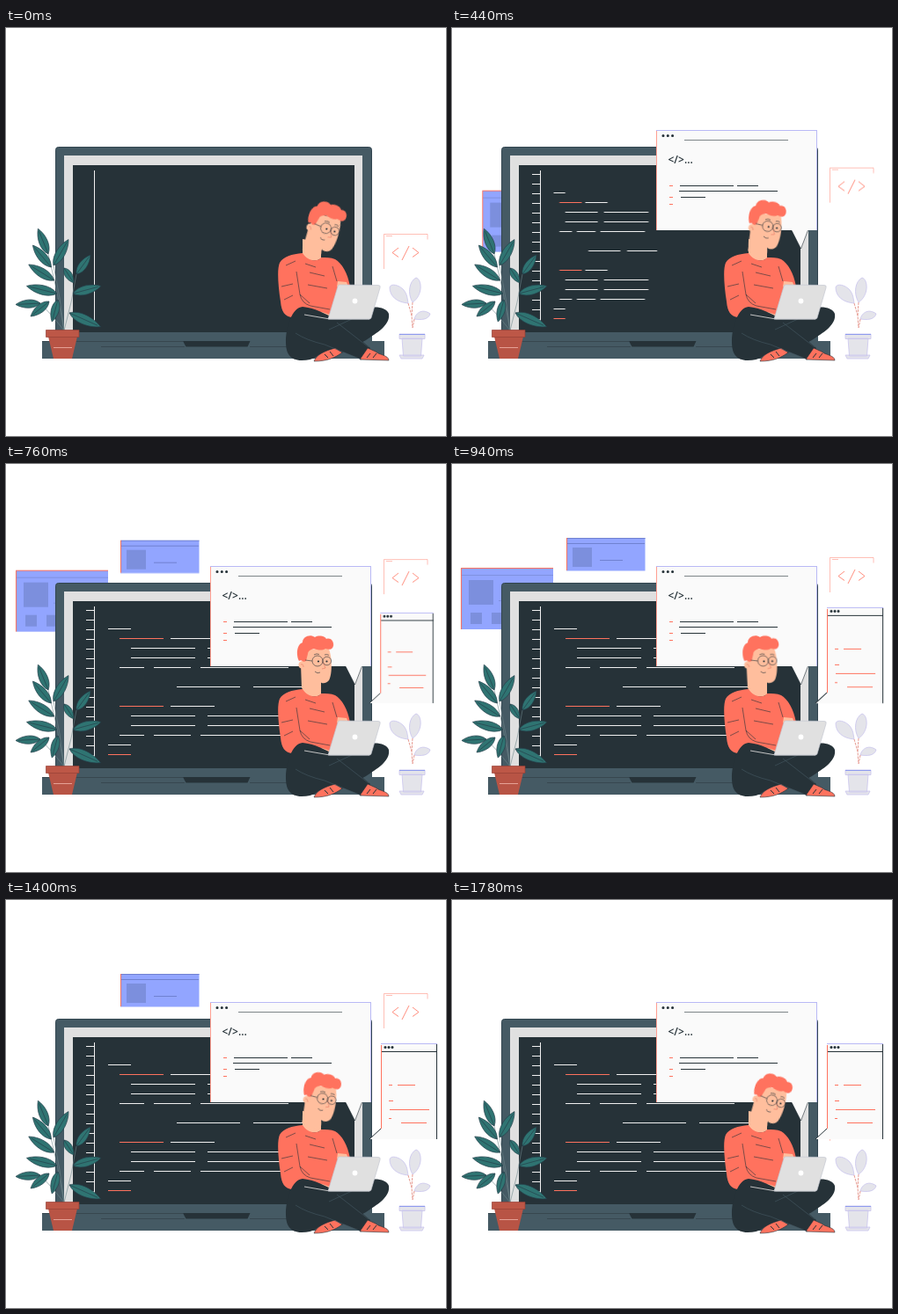
Animation of 500 by 464 pixels, one loop 1800 ms. Source, as an HTML page:

```html
<!DOCTYPE html>
<html lang="en">
<head>
<meta charset="utf-8">
<title>Developer at work</title>
<style>
html, body { margin: 0; width: 100%; height: 100%; overflow: hidden; background: #fff; }
svg { display: block; width: 500px; height: 464px; }
.slide, .drop, .bubble, #code, #cover, #head { animation: 1800ms linear infinite; }
.slide { animation-name: slide; }
.drop { animation-name: drop; }
#bigBubble { animation-name: popBig; transform-origin: 400px 249px; }
#sideBubble { animation-name: popSide; transform-origin: 413px 272px; }
#code { animation-name: type; transform-origin: 115px 0; }
#cover { animation-name: uncover; transform-origin: 95px 334px; }
#head { animation-name: nod; transform-origin: 347px 256px; }

/* rise, rest, sink */
@keyframes slide {
  0%, 12.2% { transform: translate(0, var(--dy)); animation-timing-function: ease; }
  48.3%, 80% { transform: none; animation-timing-function: ease; }
  100% { transform: translate(0, var(--dy)); }
}
@keyframes drop {
  0%, 12.2% { transform: translate(59px, 162px); animation-timing-function: ease; }
  48.3%, 66.7% { transform: none; animation-timing-function: ease; }
  81%, 100% { transform: translate(59px, 162px); }
}
@keyframes popBig {
  0%, 1.1% { transform: scale(0); }
  10.7% { transform: scale(1.2); animation-timing-function: ease-in-out; }
  18.6%, 100% { transform: none; }
}
@keyframes popSide {
  0%, 33.3% { transform: scale(0); }
  44.7% { transform: scale(1.2); animation-timing-function: ease-in-out; }
  52.8%, 100% { transform: none; }
}
@keyframes type {
  0%, 16.7% { transform: scaleX(0); animation-timing-function: ease-in-out; }
  32.2%, 100% { transform: none; }
}
@keyframes uncover {
  0%, 4.6% { transform: none; }
  24.4%, 100% { transform: scaleY(0); }
}
@keyframes nod {
  0%, 100% { transform: rotate(18deg); animation-timing-function: ease-in-out; }
  50% { transform: rotate(-1deg); animation-timing-function: ease-in-out; }
}
.line { fill: none; stroke-width: 1; }
.thin { stroke-width: .6; }
.ink { stroke: #263238; }
.coral { stroke: #ff725e; }
.dots { stroke: #263238; stroke-width: 3.1; stroke-linecap: round; }
.dark { fill: #263238; }
.skin { fill: #ffbe9d; }
.wool { fill: #ff725e; }
</style>
</head>
<body>
<svg viewBox="0 0 500 464">
  <!-- cards behind the monitor -->
  <g class="drop">
    <path fill="#92a5ff" d="M10 118h105v70H10z"/>
    <path fill="#7c8fdd" d="M19 132h28v28H19zM21 169h13v13H21zM45 169h13v13H45z"/>
    <path class="line" stroke="#8091e0" d="M11 126.500h104M53 155.500h14"/>
    <path class="line coral" d="M10.500 188v-69.500H115"/>
  </g>
  <g class="slide" style="--dy:162px">
    <path fill="#92a5ff" d="M130 84h89.500v37.500H130z"/>
    <path fill="#7c8fdd" d="M137 95h22v22h-22z"/>
    <path class="line" stroke="#7081d0" d="M130 84.500h89.500M131 90.500h88M168 109.500h26"/>
    <path class="line coral" d="M130.500 84v37"/>
  </g>

  <!-- monitor -->
  <path fill="#455a64" stroke="#324550" d="M56.500 347V138.500q0-3 3-3h353q3 0 3 3V347z"/>
  <path fill="#455a64" d="M56 346h360v10h14v20H41v-20h15z"/>
  <path fill="#e0e0e0" d="M66 145h339v201H66z"/>
  <path class="dark" d="M76 156h320v190H76zM201 356h76.500l-3 6.500h-70z"/>
  <path class="line" stroke="#37474f" d="M41 356.500h160M108 362.500h95M277 362.500h45"/>
  <path stroke="#f0f0f0" stroke-width="9" stroke-dasharray="1 10" d="M95.500 166V333"/>
  <path id="cover" class="dark" d="M90 162h10v172H90z"/>
  <path class="line" stroke="#f0f0f0" d="M100.500 162V333"/>
  <g id="code"></g>

  <!-- small window -->
  <g class="slide" style="--dy:128px">
    <path fill="#fff" d="M430 106h49v40h-49z"/>
    <path class="line coral" opacity=".45" d="M429.500 146v-39.500h49.500v6M432 108.500h7"/>
    <path class="line coral" opacity=".8" d="M446 122l-7 5.500 7 5M458 120l-8 16M462 122l7 5.500-7 5"/>
  </g>

  <!-- large speech bubble -->
  <g id="bigBubble" class="bubble">
    <path fill="#fafafa" d="M232 116h183v114h-10.500l-8 21-10.500-21H232z"/>
    <path class="line thin ink" d="M386 230.500l10.500 20.500 8-21"/>
    <path class="line" stroke="#b9b9f5" d="M232 116.500h183M414.500 117v113"/>
    <path class="line" stroke="#ff9f92" d="M232.500 117v113"/>
    <path class="line" stroke="#7d8588" d="M264 127.500h118"/>
    <path class="dots" stroke-dasharray="0 5.300" d="M240 122.500h11"/>
    <text x="245.500" y="153.500" font-family="'Open Sans', sans-serif" font-size="12" font-weight="600" fill="#263238">&lt;/&gt;...</text>
    <path class="line ink" d="M259 179.500h61M324 179.500h24M258 185.500h112M260 192.500h28"/>
    <path class="line coral" d="M247 179.500h4M247 192.500h4M247 200.500h4"/>
  </g>

  <!-- side speech bubble -->
  <g id="sideBubble" class="bubble">
    <path fill="#fafafa" d="M426 163h64v109h-77l13-13z"/>
    <path class="line" stroke="#b9b9f5" d="M426 163.500h64"/>
    <path class="line ink" d="M427 172.500h63M489.500 164v108M426 260l-13 12"/>
    <path class="line coral" d="M426.500 165v95M435 210.500h4M445 210.500h20M435 228.500h5M436 238.500h45M435 248.500h3M449 253.500h29"/>
    <path class="dots" stroke-dasharray="0 4" d="M431 167.500h8.500"/>
  </g>

  <!-- pale plant -->
  <g fill="#e4e4ea" stroke="#c9c5ee" stroke-width=".8">
    <path d="M457 313c-13-1-21-8-21-18 1-5 11-3 16 3 4 5 4 9 5 15z"/>
    <path d="M462 312c-6-10-4-24 4-28 7 2 8 20-4 28z"/>
    <path d="M464 331c2-8 10-12 18-6-2 7-10 7-18 6z"/>
    <path d="M450 353h23l-1.500 20h-20zM447 348h29v5.500h-29zM447 372h28l-2 4h-24z"/>
  </g>
  <path class="line" stroke="#e69a90" stroke-dasharray="3 1" d="M457 313l4 14 1 14M462 312l-1 15M464 331l-2 10"/>
  <path class="line" stroke="#8e9bef" d="M447 348.500h29"/>

  <!-- man -->
  <path class="skin" d="M337 240l21 4v18q-9 6-21-2z"/>
  <path class="wool" d="M337 256c-12 1-22 4-26 11-3 7-2 25 1 44 1 12 5 17 13 18l42 1 24-36c-3-16-9-26-17-31-5-2-10-2-16-2-3 5-15 5-21-5z"/>
  <path class="skin" d="M343 324l16-1 12 4-3 5-22-1zM377 288l10 1 2 5h-13z"/>
  <path class="line thin ink" d="M330 277l4 26q2 10 12 13l22 4M334 303l11 10M318 270l11-5M313 294l13-3M345 278l17 4M340 268l12 4M343 292l22 4M371 271l5 17M316 309l10-5"/>
  <path class="dark" d="M397 323c16-8 35-7 38 2 2 13-14 22-26 30l-26 14-20 8-30-20 40-27z"/>
  <path class="dark" d="M337 317c13 1 26 8 39 15l38 32-10 13-42-17c-3 12-12 18-26 18-14 0-18-9-18-21 0-17 7-39 19-40z"/>
  <path class="wool" stroke="#263238" stroke-width=".6" d="M350 379c3-8 13-12 24-15l8 5c-8 6-17 10-32 10zM402 377l9-13 9 4c4 4 15 4 15 10z"/>
  <path class="line ink" d="M362 371l4 4M368 368l4 5M414 370l-4 5M421 370l-4 5"/>
  <path class="line thin" stroke="#455a64" d="M329 347q12 8 33 13l42 17M367 343l26-12M376 335l36 28"/>
  <path class="line" stroke="#c4c4c4" d="M339 326l29 5h45"/>
  <path fill="#e0e0e0" stroke="#c5c8d2" stroke-width=".7" d="M379 292l44 .5q3 0 2 3l-10 34q-.6 1.500-2 1.500h-47l11-37q.5-2 2-2z"/>
  <circle cx="396.500" cy="310.500" r="2.900" fill="#fff"/>

  <g id="head">
    <path class="skin" d="M336 255l-1-28 4-15 27-4c5 10 5 32 1 38-4 5-9 3-10 2l1 8q-11 7-22-1z"/>
    <path class="wool" d="M333 224c-4-8-2-19 4-21 0-7 9-10 14-6 5-3 12-1 13 2 6-2 9 4 8 8-1 5-6 4-9 3-4 3-10 1-13 0-4 1-7 3-7 6l-2 8-3 1q-2-3-5-1z"/>
    <circle cx="336.500" cy="228.500" r="4" class="skin"/>
    <path class="line thin" stroke="#e57561" d="M335 228q3-1 3 3M360 225l3 7-4 1"/>
    <path class="line thin ink" d="M348 224a6 6 0 1 0 12 0a6 6 0 1 0-12 0l-8-1M360 224a4.800 4.800 0 1 0 9.600 0a4.800 4.800 0 1 0-9.600 0M350 217q3-2 6-.5M362 217q3-1 5 .5M351 236q3 3 6 1"/>
    <path class="dots" style="stroke-width:2.200" stroke-dasharray="0 9.500" d="M355 224.500h10"/>
  </g>

  <!-- potted plant -->
  <g id="stems" class="line thin" stroke="#6f868c"></g>
  <g id="leaves" fill="#2f7472" stroke="#263f4b" stroke-width=".7"></g>
  <path fill="#b85445" d="M48 351h33l-6 25H54z"/>
  <path fill="#bd5747" stroke="#963f35" stroke-width=".7" d="M45.500 343.500h37.500v8H45.500z"/>
  <path class="line" stroke="#e6a196" d="M54 363.500h21"/>
</svg>
<script>
const NS = "http://www.w3.org/2000/svg";
function addPath(id, d, fill) {
  const path = document.createElementNS(NS, "path");
  path.setAttribute("d", d);
  if (fill) path.setAttribute("fill", fill);
  document.getElementById(id).append(path);
}

// kinds of code line, laid out on a grid of 13 by 11 px
const kinds = {
  word: { indent: 0, gap: 0, dashes: [26] },
  call: { indent: 1, gap: 8, dashes: [50, 50], warm: true },
  body: { indent: 2, gap: 14, dashes: [73, 100] },
  test: { indent: 1, gap: 11, dashes: [28, 42, 100] },
  note: { indent: 6, gap: 15, dashes: [72, 68] }
};
const listing = "word call body body test - note - call body body test word word".split(" ");
listing.forEach((name, row) => {
  if (name === "-") return;
  const { indent, gap, dashes, warm } = kinds[name];
  let x = 116 + indent * 13;
  dashes.forEach((len, i) => {
    const accent = (warm && i === 0) || row === listing.length - 1;
    addPath("code", `M${x} ${187 + row * 11}h${len}v1h${-len}z`, accent ? "#ff725e" : "#f0f0f0");
    x += len + gap;
  });
});

function leaf(x, y, degrees, len) {
  const a = degrees * Math.PI / 180, half = 3.5 + len * 0.12;
  const at = (along, side) => {
    const u = along * len, v = side * half;
    return `${x + u * Math.cos(a) - v * Math.sin(a)} ${y + u * Math.sin(a) + v * Math.cos(a)}`;
  };
  addPath("leaves", `M${x} ${y}C${at(.25, 1)} ${at(.7, .8)} ${at(1, 0)}C${at(.7, -.8)} ${at(.25, -1)} ${x} ${y}L${at(.9, 0)}`);
}

// leaves whose base, angle and length change by a fixed step
function spray(count, start, step) {
  for (let i = 0; i < count; i++) leaf(...start.map((v, k) => v + step[k] * i));
  const [x, y] = start;
  addPath("stems", `M66 344Q${(x + 70) / 2} ${(y + 344) / 2} ${x} ${y}`);
}
spray(4, [48, 257, -112, 31], [3.3, 15, -18, 1.5]);
spray(3, [39, 313, 177, 28], [10, -2, -36, -1]);
spray(2, [54, 270, -60, 34], [12, 3, 117, -14]);
spray(3, [80, 280, -54, 27], [-4, 22, 39, 6]);
</script>
</body>
</html>
```
